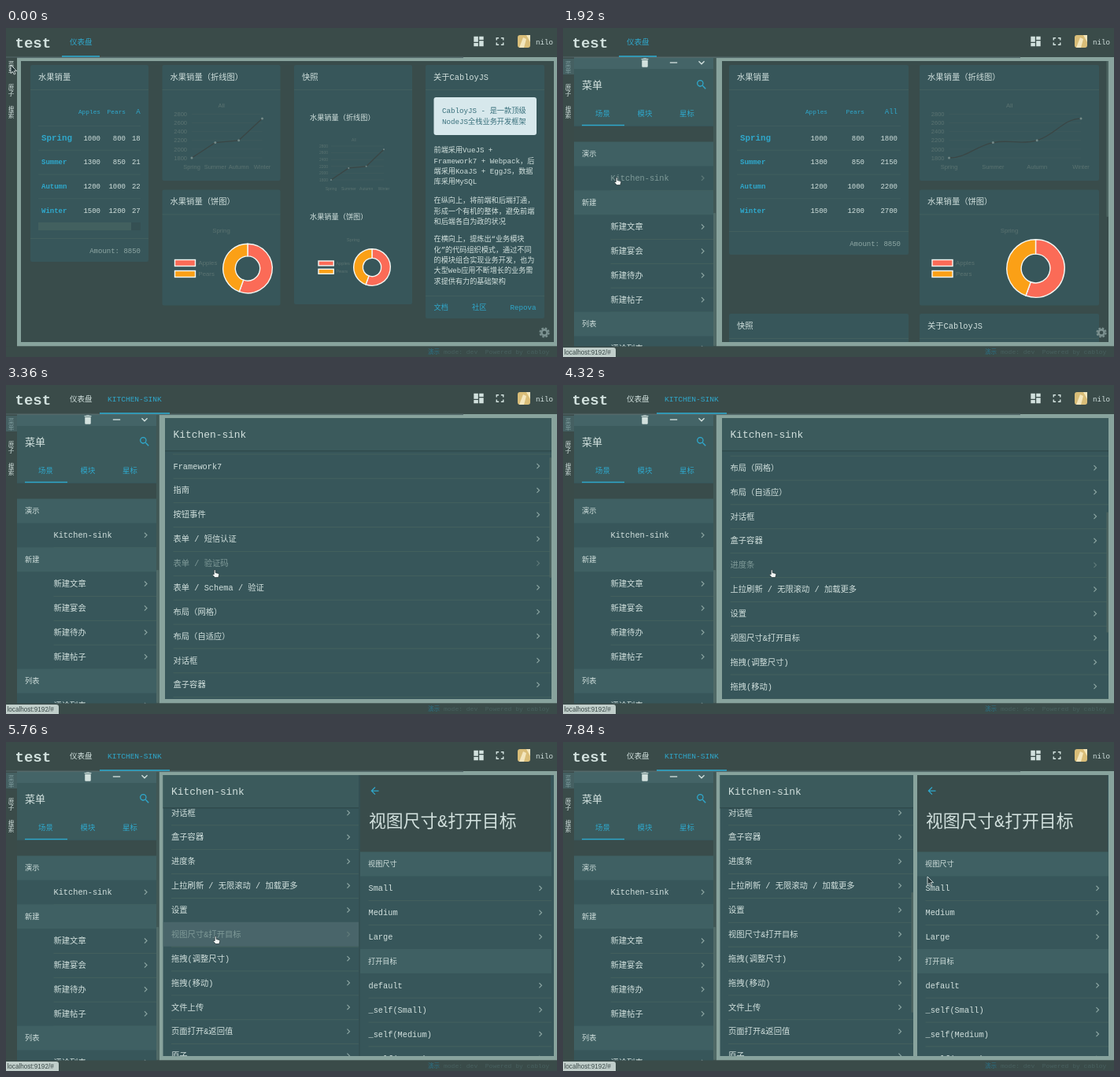
Recreate the animation shown at these times as an HTML page. Size 700x418 px, loop 8000 ms.

```html
<!DOCTYPE html>
<html lang="zh-CN">
<head>
<meta charset="utf-8">
<title>Dashboard demo</title>
<style>
html, body { margin: 0; width: 100%; height: 100%; overflow: hidden; background: #3a4b49; }
svg { display: block; }
text { font-family: "Liberation Mono", "Noto Sans CJK SC", "Noto Sans CJK", monospace; white-space: pre; }
text.sans { font-family: "Liberation Sans", sans-serif; }
</style>
</head>
<body>
<svg id="stage" width="700" height="418" viewBox="0 0 700 418"></svg>
<script>
const LOOP = 8000, STEP = 160;
const C = {
  bar: '#3a4b49', page: '#394c4b', card: '#37565a', head: '#3b5a5c', group: '#3f6063', strip: '#446467',
  frame: '#88a39d', text: '#d2e1de', dim: '#7f9a98', faint: '#5b7371', line: '#45625f',
  grid: '#3f5b5c', curve: '#3a4645', blue: '#2fa8cc', red: '#fb6b57', orange: '#fba016'
};
const ICON = {
  dash: 'M3 13h8V3H3zM3 21h8v-6H3zM13 21h8V11h-8zM13 3v6h8V3z',
  full: 'M7 14H5v5h5v-2H7zM5 10h2V7h3V5H5zM17 17h-3v2h5v-5h-2zM14 5v2h3v3h2V5z',
  trash: 'M6 19c0 1.1.9 2 2 2h8c1.1 0 2-.9 2-2V7H6zM19 4h-3.5l-1-1h-5l-1 1H5v2h14z',
  minus: 'M19 13H5v-2h14z',
  down: 'M16.6 8.6L12 13.2 7.4 8.6 6 10l6 6 6-6z',
  right: 'M10 6L8.6 7.4l4.6 4.6-4.6 4.6L10 18l6-6z',
  back: 'M20 11H7.8l5.6-5.6L12 4l-8 8 8 8 1.4-1.4L7.8 13H20z',
  find: 'M15.5 14h-.8l-.3-.3A6.5 6.5 0 1 0 13.7 14.4l.3.3v.8l5 5 1.5-1.5zM9.5 14a4.5 4.5 0 1 1 0-9 4.5 4.5 0 0 1 0 9z'
};
const SEASONS = [['Spring', 1000, 800], ['Summer', 1300, 850], ['Autumn', 1200, 1000], ['Winter', 1500, 1200]];
const KITCHEN = ['Framework7', '指南', '按钮事件', '表单 / 短信认证', '表单 / 验证码', '表单 / Schema / 验证',
  '布局（网格）', '布局（自适应）', '对话框', '盒子容器', '进度条', '上拉刷新 / 无限滚动 / 加载更多', '设置',
  '视图尺寸&打开目标', '拖拽(调整尺寸)', '拖拽(移动)', '文件上传', '页面打开&返回值', '原子'];
const MENU = ['#演示', 'Kitchen-sink', '#新建', '新建文章', '新建宴会', '新建待办', '新建帖子', '#列表', '评论列表'];
const VIEWS = ['#视图尺寸', 'Small', 'Medium', 'Large', '#打开目标', 'default', '_self(Small)', '_self(Medium)', '_self(Large)'];
const ABOUT = [[155, '前端采用VueJS +', 'Framework7 + Webpack，后', '端采用KoaJS + EggJS，数据', '库采用MySQL'],
  [219, '在纵向上，将前端和后端打通，', '形成一个有机的整体，避免前端', '和后端各自为政的状况'],
  [268, '在横向上，提炼出“业务模块', '化”的代码组织模式，通过不同', '的模块组合实现业务开发，也为', '大型Web应用不断增长的业务需', '求提供有力的基础架构']];
const ROW = 30.87;

// Keys are [time, ...values]
const CURSOR = [[0, 6, 47], [640, 8, 48], [1120, 8, 48], [1920, 68, 190], [2240, 68, 190], [3200, 265, 235],
  [4480, 265, 235], [5120, 266, 247], [6240, 266, 247], [7360, 600, 190], [7840, 463, 171]];
const SCROLL = [[2720, 0], [3360, 21], [4320, 204], [4480, 204], [5120, 281]];

const mix = (a, b, p) => a + (b - a) * p;
const ease = (t, a, b) => {
  const p = Math.min(1, Math.max(0, (t - a) / (b - a)));
  return p * p * (3 - 2 * p);
};
function track(keys, t, k = 1) {
  let v = keys[0][k];
  for (let i = 1; i < keys.length; i++) v += (keys[i][k] - keys[i - 1][k]) * ease(t, keys[i - 1][0], keys[i][0]);
  return v;
}
const sliding = t => t >= 5600 && t < 5920;
const rightEdge = t => t < 640 || sliding(t) ? 696 : 693;

const rect = (x, y, w, h, fill, r = 0, extra = '') =>
  `<rect x="${x}" y="${y}" width="${Math.max(0, w)}" height="${h}" rx="${r}" fill="${fill}" ${extra}/>`;
const hline = (x1, x2, y, color = C.line) => rect(x1, y, x2 - x1, .8, color);
const label = (x, y, s, size = 10.3, fill = C.text, anchor = 'start', extra = '') =>
  `<text x="${x}" y="${y + size * .35}" font-size="${size}" fill="${fill}" text-anchor="${anchor}" ${extra}>${String(s).replace(/&/g, '&amp;')}</text>`;
const sans = (x, y, s, size = 7.5, anchor = 'middle', fill = C.faint) => label(x, y, s, size, fill, anchor, 'class="sans"');
const icon = (name, x, y, size, fill = C.text) =>
  `<path d="${ICON[name]}" fill="${fill}" transform="translate(${x - size / 2} ${y - size / 2}) scale(${size / 24})"/>`;
const clip = (x, y, w, h, body) =>
  w > 0 ? `<svg x="${x}" y="${y}" width="${w}" height="${h}" viewBox="${x} ${y} ${w} ${h}">${body}</svg>` : '';

function card(x, y, w, h, title) {
  return rect(x, y, w, h, C.card, 2) + label(x + 10, y + 15, title) + hline(x, x + w, y + 31);
}

function table(x, w, wide) {
  const p = (w - 228) / 93;
  const cols = wide ? [89, 121, 150.5] : [mix(125, 178, p), mix(172, 243, p), mix(214, 306, p)];
  const end = wide ? 140 : w - 10;
  let s = label(x + cols[0], 106, 'Apples', 7.8, C.blue, 'end') + label(x + cols[1], 106, 'Pears', 7.8, C.blue, 'end')
    + label(x + cols[2], 106, 'All', 9, C.blue, 'end');
  SEASONS.forEach(([name, a, b], i) => {
    const y = 139.5 + i * 30.8;
    s += hline(x + 10, x + end, y - 15.5, '#42605f')
      + label(x + 14, y, name, i ? 9 : 10.8, C.blue, 'start', 'font-weight="700"');
    [a, b, a + b].forEach((v, k) => s += label(x + cols[k], y, v, 9, C.text, 'end'));
  });
  const foot = wide ? 267 : 258;
  return card(x, 47, w, wide ? 250 : 241, '水果销量') + clip(x, 80, end, 166, s)
    + (wide ? rect(x + 10, 247, 130, 10, '#42605f') + rect(x + 128, 247, 12, 10, '#355053') : '')
    + hline(x, x + w, foot) + label(x + w - 10, foot + 16, 'Amount: 8850', 9, '#8fa8a5', 'end');
}

function plot(x1, x2, y, h, size, bend) {
  let s = sans((x1 + x2) / 2 - 7 * size / 7.5, y - 11 * size / 7.5, 'All', size);
  for (let i = 0; i < 6; i++) {
    const gy = y + h * i / 5;
    s += hline(x1, x2, gy - .4, C.grid) + sans(x1 - 6 * size / 7.5, gy, 2800 - i * 200, size, 'end');
  }
  const pts = SEASONS.map(([, a, b], i) => [mix(x1, x2, i / 3), y + h * (2800 - a - b) / 1000]);
  const slope = i => i % 3 ? (pts[i + 1][1] - pts[i - 1][1]) / 2 * bend : 0;
  const dx = (x2 - x1) / 3 * bend;
  let d = `M${pts[0]}`;
  for (let i = 1; i < 4; i++) {
    const [a, b] = [pts[i - 1], pts[i]];
    d += `C${a[0] + dx},${a[1] + slope(i - 1)} ${b[0] - dx},${b[1] - slope(i)} ${b}`;
  }
  s += `<path d="${d}" fill="none" stroke="${C.curve}" stroke-width="1.3"/>`;
  pts.forEach(([px, py], i) => {
    s += `<circle cx="${px}" cy="${py}" r="${size / 5}" fill="#748a88"/>` + sans(px, y + h + 11, SEASONS[i][0], size);
  });
  return s;
}

function donut(cx, cy, r, lx, ly, k, mid, top) {
  const a = Math.PI * 10 / 9, q = r / 2;
  const sx = Math.sin(a), sy = -Math.cos(a);
  const arc = (large, from, to, fill) => `<path d="M${cx + from[0] * r} ${cy + from[1] * r}A${r} ${r} 0 ${large} 1 ${cx + to[0] * r} ${cy + to[1] * r}`
    + `L${cx + to[0] * q} ${cy + to[1] * q}A${q} ${q} 0 ${large} 0 ${cx + from[0] * q} ${cy + from[1] * q}Z" fill="${fill}" stroke="#f4f6f2" stroke-width="1.4"/>`;
  const key = (y, name, fill) => rect(lx, y, 26 * k, 8 * k, fill, 0, 'stroke="#f4f6f2" stroke-width="1.4"')
    + sans(lx + 30 * k, y + 4 * k, name, 7.8 * k, 'start');
  return sans(mid, top, 'Spring', 7.8 * k) + key(ly, 'Apples', C.red) + key(ly + 14 * k, 'Pears', C.orange)
    + arc(1, [0, -1], [sx, sy], C.red) + arc(0, [sx, sy], [0, -1], C.orange);
}

function charts(x, w, wide) {
  const cx = x + 33.5 + w / 2;
  return card(x, 47, w, 147, '水果销量（折线图）') + plot(x + 37.5, x + w - 23, 109.5, 55.5, 7.5, wide ? 0 : .4)
    + card(x, 205.5, w, 147, '水果销量（饼图）')
    + donut(cx, 305.5, wide ? 31.3 : 36.7, x + 16, 294.5, 1, x + w / 2, 257.5);
}

function snapshot(x) {
  return card(x, 47, 150, 304, '快照') + label(x + 20, 114, '水果销量（折线图）', 9.2)
    + plot(x + 47, x + 114, 150, 43, 5, 0) + label(x + 20, 240, '水果销量（饼图）', 9.2)
    + donut(x + 99, 304, 23.3, x + 31, 296, .74, x + 75, 268.5);
}

function about(x) {
  let s = card(x, 47, 151, 322, '关于CabloyJS') + rect(x + 10.5, 88, 130.5, 48, '#d7e8ec', 3)
    + label(x + 21, 105, 'CabloyJS - 是一款顶级', 9.2, '#39707c') + label(x + 21, 118.5, 'NodeJS全栈业务开发框架', 9.2, '#39707c');
  for (const [y, ...lines] of ABOUT) lines.forEach((l, i) => s += label(x + 10.5, y + i * 13.4, l, 9.15));
  return s + hline(x, x + 151, 340) + label(x + 10.5, 355, '文档', 9.2, C.blue) + label(x + 59, 355, '社区', 9.2, C.blue)
    + label(x + 140.5, 355, 'Repova', 9.2, C.blue, 'end');
}

function dashboard(t, open) {
  const left = mix(19, 202, open), width = rightEdge(t) - left;
  let s = rect(left, 42, width, 357, C.page);
  if (t < 640) {
    s += table(31, 150, true) + charts(198.5, 150, true) + snapshot(366) + about(533);
  } else {
    const w = mix(321, 228, open), a = left + 9, b = mix(362, 453, open);
    s += table(a, w) + charts(b, w) + card(a, 363, w, 60, '快照') + card(b, 363, w, 60, '关于CabloyJS')
      + rect(690.5, 42, 2.5, 198, '#4c6461', 1);
  }
  const gear = `<g fill="none" stroke="#7b908f"><circle cx="684" cy="387" r="3.6" stroke-width="2.6"/>`
    + `<circle cx="684" cy="387" r="5.6" stroke-width="2" stroke-dasharray="2.6 1.8"/></g>`;
  return clip(left, 42, width, 357, s) + gear;
}

// Rows starting with # are group titles
function list(items, x, w, y0, pad, arrowX, on = -1, lit = false) {
  return items.map((s, i) => {
    const y = y0 + i * ROW, top = y - ROW / 2;
    if (s[0] == '#') return rect(x, top, w, ROW, C.group) + label(x + 10, y, s.slice(1), 9.2);
    return (lit && i == on ? rect(x, top, w, ROW, '#49656a') : '') + hline(x + pad, x + w, top + ROW, '#47645f')
      + label(x + pad, y, s, 10.3, i == on ? C.dim : C.text)
      + icon('right', arrowX, y, 14, i == on ? '#5f7a79' : '#8ba5a2');
  }).join('');
}

function kitchen(t) {
  const split = t >= 5600, moving = sliding(t), edge = rightEdge(t);
  const x = split ? 199.5 : 202, end = moving ? 448 : split ? 445 : edge;
  const y0 = 124 - track(SCROLL, t), w = end - x;
  const cx = track(CURSOR, t), cy = track(CURSOR, t, 2) + 5;
  const on = cx > x && cx < end && t >= 3040 && t < 6720 ? Math.floor((cy - y0) / ROW + .5) : -1;
  let s = rect(x, 42, w, 357, C.card)
    + clip(x, 84, w, 315, hline(x + 10, end, y0 - ROW / 2) + list(KITCHEN, x, w, y0, 10.5, end - (moving ? 13 : 17), on, split))
    + rect(x, 42, w, 41.5, C.head) + rect(x, 83, w, 1.5, '#304a4c') + label(x + 10.5, 62, 'Kitchen-sink', 12.9);
  if (!moving) s += rect(end - 2.5, 84 + track(SCROLL, t) * .38, 2.5, 153, '#4c6461', 1);
  if (!split) return s;
  if (moving) s += rect(448, 42, 2, 357, '#345053');
  s += rect(450, 42, edge - 450, 357, C.card);
  if (t >= 5760) {
    s += clip(450, 42, edge - 450, 357, rect(450, 42, 242, 98, C.page) + icon('back', 468.5, 62, 15, C.blue)
      + label(461, 100.3, '视图尺寸&打开目标', 21.8) + list(VIEWS, 450, 243, 155, 10.5, 679));
  }
  return s;
}

function panel(t, open) {
  const x = mix(-180, 0, open);
  const body = rect(14, 38, 177, 367, C.card) + rect(14, 38, 177, 86, C.head) + rect(14, 38, 177, 14, C.strip)
    + icon('trash', 104, 44, 15) + icon('minus', 140.5, 44, 16) + icon('down', 176, 44, 16)
    + label(24, 72, '菜单', 13) + icon('find', 176, 72, 16, C.blue)
    + ['场景', '模块', '星标'].map((s, i) => label(50.5 + i * 53.5, 108.5, s, 9.4, C.blue, 'middle')).join('')
    + rect(24, 122.8, 54, 1.4, C.blue) + rect(14, 125, 177, 20, C.page)
    + list(MENU, 14, 177, 160, 46.5, 177.5, t >= 1760 && t < 2400 ? 1 : -1)
    + rect(191, 38, 3.5, 367, '#405755') + rect(191, 235, 3, 169, '#506a67', 1);
  return clip(14, 38, 181, 367, `<g transform="translate(${x} 0)">${body}</g>`);
}

function chrome(t) {
  const second = t >= 2400;
  let s = rect(0, 0, 700, 37, C.bar) + rect(0, 36.5, 581, 1.6, '#54696a')
    + label(11.5, 18.5, 'test', 19, C.text, 'start', 'font-weight="700"')
    + label(81, 17.5, '仪表盘', 9.5, second ? C.text : C.blue);
  if (second) s += label(129, 17.5, 'KITCHEN-SINK', 9.55, C.blue);
  s += second ? rect(119, 35.2, 89, 1.6, C.blue) : rect(71, 35.2, 48, 1.6, C.blue);
  s += icon('dash', 600.5, 17, 16.5) + icon('full', 627.5, 17, 17)
    + rect(650, 9, 16, 16, '#d9bd78', 3) + `<path d="M652 25l5-13 4 2-3 11zM661 9l5 0v9z" fill="#f3e6bd"/>`
    + label(673, 17.5, 'nilo', 9.2);
  s += rect(0, 37.5, 14, 367, C.bar);
  if (t >= 480) s += rect(0, 39, 14, 20, '#456062');
  ['菜单', '原子', '搜索'].forEach((w, i) => {
    const fill = i || t < 480 ? C.text : '#7b999b';
    [...w].forEach((ch, k) => s += label(6.5, 46.5 + i * 28.4 + k * 8.2, ch, 7.6, fill, 'middle'));
  });
  return s;
}

function footer(t) {
  let s = rect(0, 404.5, 700, 13.5, C.bar) + label(536, 411.5, '演示', 7.5, '#2b7186')
    + label(556, 411.5, 'mode: dev  Powered by cabloy', 8, '#48605f');
  if (t >= 480) s += `<path d="M0 406H64q3 0 3 3V418H0z" fill="#c0cecA"/>` + sans(1.5, 412.3, 'localhost:9192/#', 8.15, 'start', '#3a4a49');
  return s;
}

function pointer(t) {
  const arrow = t < 480 || t >= 7680;
  const d = arrow ? 'M0 0V10.5L2.5 8.3 4.2 12 5.9 11.2 4.3 7.6H7.6Z'
    : 'M-.8 .2Q.4-.8 1.2.2V3.5L5 4.4Q6 5 5.6 6.6L4.8 9.6H.4L-2.6 6.4Q-2.8 5-.8 5.6Z';
  return `<path d="${d}" transform="translate(${track(CURSOR, t)} ${track(CURSOR, t, 2)})" fill="${arrow ? '#26373a' : '#f2f6f4'}" `
    + `stroke="${arrow ? '#e6efec' : '#26373a'}" stroke-width=".8"/>`;
}

function draw(t) {
  const open = ease(t, 800, 1440), x = mix(14, 194.5, open);
  let s = rect(0, 0, 700, 418, C.bar) + rect(x, 37, 700 - x, 367.5, C.frame);
  s += t < 2400 ? dashboard(t, open) : kitchen(t);
  if (open > 0) s += panel(t, open);
  return s + chrome(t) + footer(t) + pointer(t);
}

const stage = document.getElementById('stage');
const start = performance.now();
let shown = -1;
function tick() {
  const t = Math.floor((performance.now() - start) % LOOP / STEP) * STEP;
  if (t !== shown) stage.innerHTML = draw(shown = t);
  requestAnimationFrame(tick);
}
tick();
</script>
</body>
</html>
```
